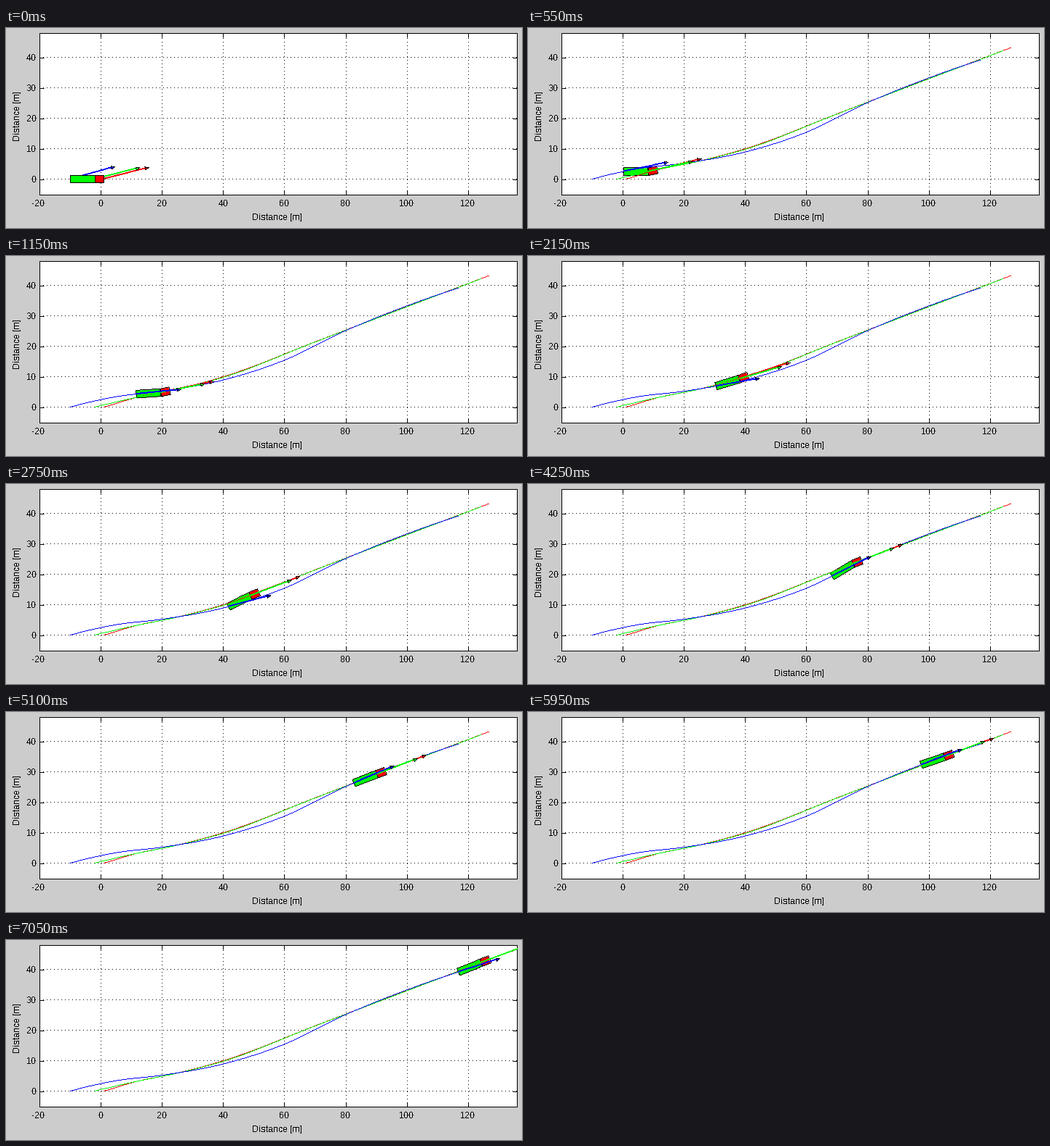
Animation, 709 px wide and 276 px high, one loop 7.1 s. Source, as a matplotlib script:

```python
import numpy as np
import matplotlib.pyplot as plt
from matplotlib.animation import FuncAnimation

W, H, DPI = 709, 276, 64
PX = 72 / DPI
FRAMES, STEP_MS = 142, 50
X0, X1, Y0, Y1 = -20, 136, -5, 48
SCALE = 656 / (X1 - X0)
TRAILER, CAB, HALF_WIDTH = 8.0, 3.0, 1.25
RED, GREEN, BLUE = "#ff0000", "#00ff00", "#0000ff"

plt.rcParams.update({
    "font.family": "Liberation Sans",
    "font.size": 12 * PX,
    "text.antialiased": False,
    "text.hinting": "native",
    "text.hinting_factor": 1,
    "axes.linewidth": PX,
})


def smooth_curve(*points):
    """Cubic Hermite curve y(x) through the given points."""
    px, py = np.array(points, float).T
    slope = np.gradient(py, px, edge_order=2)

    def curve(x):
        i = np.clip(np.searchsorted(px, x) - 1, 0, len(px) - 2)
        h = px[i + 1] - px[i]
        t = (x - px[i]) / h
        return ((1 + 2 * t) * (1 - t) ** 2 * py[i] + t * (1 - t) ** 2 * h * slope[i]
                + t * t * (3 - 2 * t) * py[i + 1] + t * t * (t - 1) * h * slope[i + 1])

    return curve


joint_path = smooth_curve((-2, 0), (10, 2.85), (25, 5.9), (40, 9.8),
                          (69, 21), (90, 29.1), (124.2, 42.1))
rear_path = smooth_curve((-10, 0), (5, 3.4), (20, 5.2), (40, 8.9),
                         (60, 15.4), (80, 25.1), (93, 30.5), (116.9, 39.1))


def bump(x, center, width):
    return np.exp(-((x - center) / width) ** 2)


def front_path(x):
    return joint_path(x) - joint_path(1) * bump(x, 1, 7) + 0.15 * bump(x, 43, 11)


def linked(path, pivot, dist):
    """Points on path at a signed distance from each pivot."""
    gx, gy = pivot.T
    x = gx + dist
    for _ in range(30):
        x = gx + np.sign(dist) * np.sqrt(dist ** 2 - (gy - path(x)) ** 2)
    return np.column_stack([x, path(x)])


def unit(v):
    return v / np.linalg.norm(v, axis=-1, keepdims=True) if False else v / np.hypot(v[..., :1], v[..., 1:])


def raster(points):
    """One sample per pixel along a polyline."""
    parts = []
    for a, b in zip(points[:-1], points[1:]):
        n = int(np.ceil(np.abs(b - a).max() * SCALE)) + 1
        parts.append(np.linspace(a, b, n))
    return np.concatenate(parts).T


# The joint moves along its path at nearly constant speed.
u = np.linspace(0, 1, FRAMES)
xs = np.linspace(-2, 124.2, 3000)
arc = np.concatenate([[0], np.cumsum(np.hypot(np.diff(xs), np.diff(joint_path(xs))))])
jx = np.interp(arc[-1] * (u + 0.015 * u * (1 - u)), arc, xs)
joint = np.column_stack([jx, joint_path(jx)])
rear = linked(rear_path, joint, -TRAILER)
front = linked(front_path, joint, CAB)
reach = 14.2 + 0.9 * np.exp(-5 * u)

fig = plt.figure(figsize=(W / DPI, H / DPI), dpi=DPI, facecolor="#cccccc")
ax = fig.add_axes([46 / W, 46 / H, 656 / W, 223 / H])
xticks, yticks = range(-20, 121, 20), range(0, 41, 10)
ax.set(xlim=(X0, X1), ylim=(Y0, Y1), xticks=xticks, yticks=yticks)
ax.tick_params(direction="in", length=6 * PX, width=PX, top=True, right=True,
               labelbottom=False, labelleft=False)


def dots(x, y, color, z):
    """Crisp one-pixel dots."""
    return ax.plot(x, y, ",", color=color, zorder=z)[0]


def label(text, xy, offset, ha):
    ax.annotate(text, xy, offset, textcoords="offset pixels", ha=ha, va="baseline",
                annotation_clip=False)


gap = 5 / SCALE
for v in xticks:
    y = np.arange(Y0, Y1, gap)
    dots(np.full_like(y, v), y, "black", 0.5)
    label(str(v), (v, Y0), (-2 if v < 0 else 0, -16), "center")
for v in yticks:
    x = np.arange(X0, X1, gap)
    dots(x, np.full_like(x, v), "black", 0.5)
    label(str(v), (X0, v), (-4, -4), "right")
fig.text(372.5 / W, 11 / H, "Distance [m]", ha="center", va="baseline")
fig.text(15.5 / W, 155 / H, "Distance [m]", ha="center", va="center", rotation=90)


def add_shape(color, z):
    """A filled polygon with a one-pixel black outline."""
    fill = ax.fill([0], [0], fc=color, ec="none", lw=0, zorder=z)[0]
    return fill, dots([], [], "black", z + 0.01)


def set_shape(shape, corners):
    fill, outline = shape
    fill.set_xy(corners)
    outline.set_data(*raster(corners + corners[:1]))


bodies = [add_shape(GREEN, 2), add_shape(RED, 2)]
trails, arrows = [], []
for z, (path, pos, color) in enumerate([(front_path, front, RED),
                                        (joint_path, joint, GREEN),
                                        (rear_path, rear, BLUE)]):
    x = np.arange(pos[0, 0], pos[-1, 0], 1 / SCALE)
    trails.append(dots(x, path(x), color, 3 + 0.1 * z))
    shaft = dots([], [], color, 4 + 0.1 * z)
    head = add_shape(color, 4.05 + 0.1 * z)
    arrows.append((pos, unit(np.gradient(pos, axis=0)), shaft, head))


def box(a, b):
    d = unit(b - a)
    n = HALF_WIDTH * np.array([-d[1], d[0]])
    return [a + n, b + n, b - n, a - n]


def draw(k):
    set_shape(bodies[0], box(rear[k], joint[k]))
    set_shape(bodies[1], box(joint[k], front[k]))
    for fill, outline in bodies:
        fill.set_zorder(2 if k else 6)
        outline.set_zorder(2.01 if k else 6.01)
    for trail in trails:
        trail.set_visible(k > 0)
    lift = np.array([0, 1 / SCALE])
    for pos, heading, shaft, head in arrows:
        d = heading[k]
        n = np.array([-d[1], d[0]])
        tip = pos[k] + reach[k] * d
        base = tip - 1.2 * d
        shaft.set_data(*raster([pos[k], base, base + lift, pos[k] + lift]))
        set_shape(head, [tip, base + 0.5 * n, base - 0.5 * n])
    return trails


anim = FuncAnimation(fig, draw, frames=FRAMES, interval=STEP_MS,
                     repeat=True, repeat_delay=0, blit=False)
plt.show()
```
